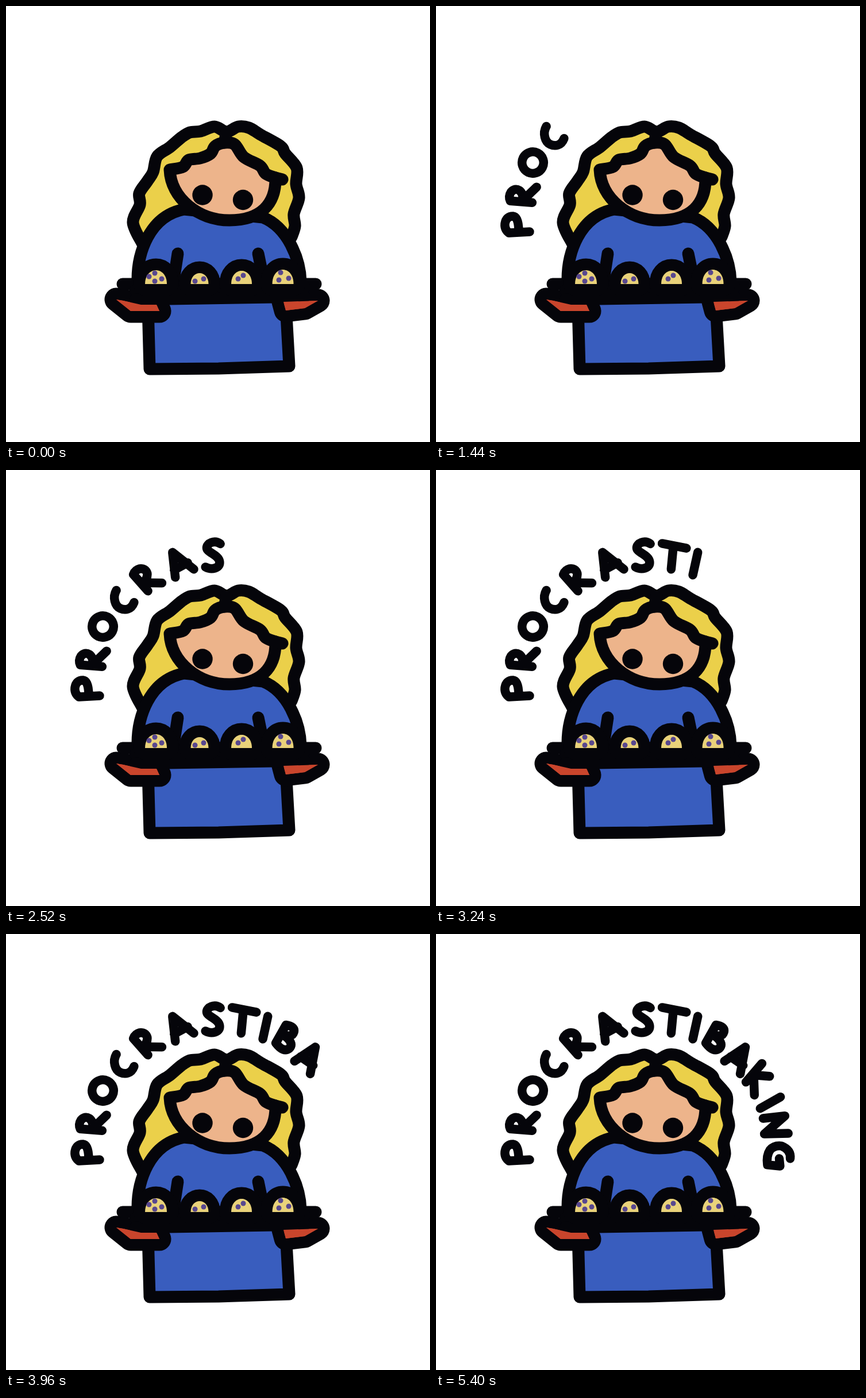
Write an HTML page that moves like this. It is 738 by 759 pixels and loops after 6.48 s.

```html
<!DOCTYPE html>
<html lang="en">
<head>
<meta charset="utf-8">
<title>Procrastibaking</title>
<style>
html, body { margin: 0; width: 100%; height: 100%; overflow: hidden; background: #fff; }
svg { display: block; width: 100%; height: 100%; }
path { stroke: #05050a; stroke-linecap: round; stroke-linejoin: round; paint-order: stroke; }
#baker path { stroke-width: 21; }
#baker .thick { stroke-width: 41; }
#baker .drawn { paint-order: normal; }
#word path { fill: none; stroke-width: 15.5; }
</style>
</head>
<body>
<svg viewBox="0 0 738 759">
  <g id="baker"></g>
  <g id="word" role="img" aria-label="PROCRASTIBAKING"></g>
</svg>
<script>
const INK = '#05050a', YELLOW = '#ebd04a', SKIN = '#edb48b', BLUE = '#395dbe',
      RED = '#c9452c', CREAM = '#e9d27a', BERRY = '#58478f';
const STEP = 360, LOOP = 6480;
const baker = document.getElementById('baker'), word = document.getElementById('word');

function add(parent, tag, attrs) {
  const el = document.createElementNS('http://www.w3.org/2000/svg', tag);
  for (const k in attrs) el.setAttribute(k, attrs[k]);
  parent.append(el);
  return el;
}

// Smooth open curve through "x,y" points
function curve(text) {
  const p = text.trim().split(/\s+/).map(s => s.split(',').map(Number));
  let d = 'M' + p[0];
  for (let i = 0; i < p.length - 1; i++) {
    const b = p[i], c = p[i + 1], a = p[i - 1] || b, e = p[i + 2] || c;
    d += `C${b.map((v, k) => v + (c[k] - a[k]) / 6)} ${c.map((v, k) => v - (e[k] - b[k]) / 6)} ${c}`;
  }
  return d;
}

const drawn = (fill, d) => add(baker, 'path', { class: 'drawn', fill, d });
const thick = (fill, d) => add(baker, 'path', { class: 'thick', fill, d });
const dot = (fill, cx, cy, r) => add(baker, 'circle', { fill, cx, cy, r });

// Hair, dress, face with fringe
drawn(YELLOW, curve(`237,413 221,377 233,346 232,326 246,305 256,289 263,262 285,246 305,229 320,220
  339,218 363,210 384,219 404,210 423,212 443,224 478,244 486,257 506,282 505,310 510,334 501,362 503,383 497,402`));
drawn(BLUE, `M310 354C250 365 228 430 229 480L247 520L250 632L370 631L493 627L487 520L513 480
  C512 440 490 385 447 368Z`);
drawn(SKIN, curve('285,285 308,280 318,268 338,265 356,257 364,244 380,238 398,241 414,263 442,278 452,292 469,299')
  + 'C470 345 443 373 389 373S287 335 285 285Z');
drawn('none', 'M384 219L380 238M469 299L481 302');
dot(INK, 342, 329, 17.7);
dot(INK, 412.5, 337.5, 17.7);

// Arms, hands and tray
drawn('none', 'M299 431L293 470M439 431L447 470');
thick(RED, 'M192 511L204 513L235 520H262L267 531H217Z');
thick(RED, 'M483 515L543 513L520 526L487 530Z');
drawn('none', 'M203 484H539');
for (const y of [494, 510]) drawn('none', `M225 ${y + 1}L520 ${y - 4}`);
for (const d of ['M192 511L204 513L235 520H262L267 531H217Z', 'M483 515L543 513L520 526L487 530Z'])
  add(baker, 'path', { fill: RED, d, style: 'stroke: none' });

// Muffin: centre, half width, height, berry offsets
function muffin(x, w, h, berries) {
  const top = 484 - h * 4 / 3;
  thick(CREAM, `M${x - w} 484C${x - w} ${top} ${x + w} ${top} ${x + w} 484Z`);
  for (const [dx, dy] of berries) dot(BERRY, x + dx, 484 + dy, 4.5);
}
muffin(261, 19, 24, [[-2, -19], [-12, -13], [10, -9], [-2, -5]]);
muffin(337, 15.5, 19, [[-8, -5], [7, -9]]);
muffin(410, 18, 23, [[-6, -9], [3, -15]]);
muffin(482, 18.5, 25, [[-4, -20], [-7, -7], [10, -10]]);

// Pen strokes of each letter around its own centre
const glyphs = {
  P: 'M-18 19L-20 -17Q-14 -25 -4 -24Q9 -22 9 -10Q8 0 -18 0',
  R: 'M-10 21L-15 -17Q-8 -22 0 -19Q9 -14 6 -5Q1 4 -10 4L18 23',
  O: 'M-19 0A18.5 18.5 0 1 0 18.5 0A18.5 18.5 0 1 0 -19 0',
  C: 'M4 -17C-10 -14 -18 0 -15 9S-4 25 9 20',
  A: 'M-17 24L-9 -19L18 20M-15 11L11 6',
  S: 'M16 -20C6 -28 -8 -22 -8 -14S12 -1 13 11S-2 25 -12 19',
  T: 'M-24 -21H19M-4 -21L0 20',
  I: 'M-3 -21L3 19',
  B: 'M-11 -20L-10 16Q10 24 15 12Q18 -2 -8 -3Q10 -6 7 -17Q4 -26 -11 -20',
  K: 'M-18 -21L-6 20M8 -20L-9 2L21 20',
  N: 'M-15 20L-12 -18L12 23L19 -18',
  G: 'M3 -21Q-12 -22 -18 -5Q-19 8 -10 15Q0 21 16 18L17 -4L4 -2'
};

// Letters stand on a circle around the baker
const angles = [-90, -78, -63, -48, -34, -17, -3, 11, 21, 31, 45.5, 57, 69, 79, 93];
const letters = [...'PROCRASTIBAKING'].map((ch, i) => add(word, 'path', {
  d: glyphs[ch], transform: `translate(370 375) rotate(${angles[i]}) translate(0 -226)`
}));

function draw(now) {
  const shown = Math.floor(now % LOOP / STEP);
  letters.forEach((el, i) => el.style.display = i < shown ? '' : 'none');
  requestAnimationFrame(draw);
}
draw(performance.now());
</script>
</body>
</html>
```
